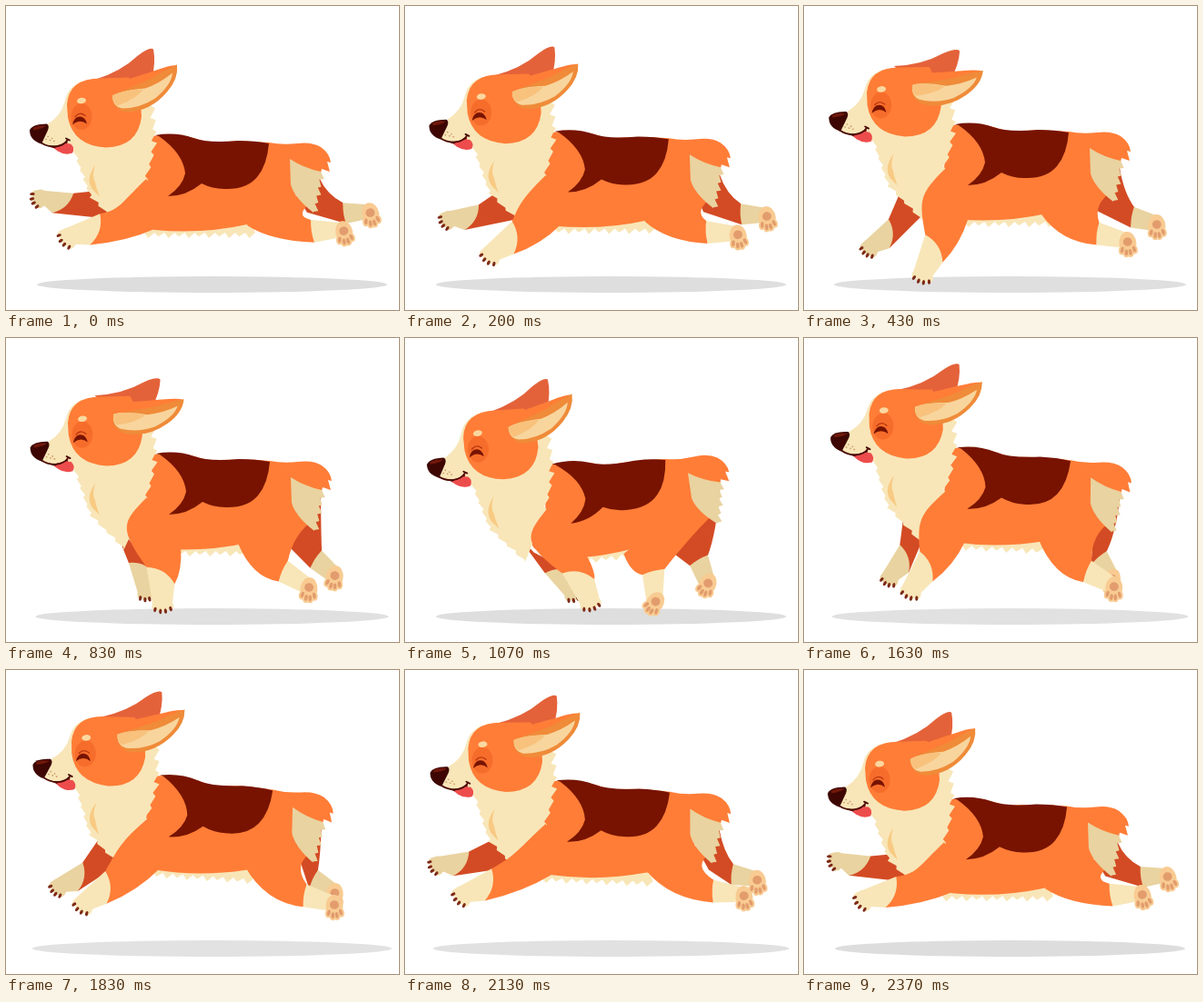
An HTML page with a canvas for the animation above (2410 ms loop, 432 by 334 pixels).

```html
<!DOCTYPE html>
<html lang="en">
<head>
<meta charset="utf-8">
<title>Running corgi</title>
<style>
html, body { margin: 0; width: 100%; height: 100%; overflow: hidden; background: #fff; }
canvas { display: block; }
</style>
</head>
<body>
<canvas id="stage" width="432" height="334"></canvas>
<script>
const ctx = document.getElementById('stage').getContext('2d');
const LOOP = 2410;
const ORANGE = '#ff7d37', RED = '#d34b24', CREAM = '#f8e6b8', SAND = '#e9d3a0',
      BROWN = '#771300', TAN = '#f8cb92', PAD = '#e29c6d', CLAW = '#7d2a17';

// Key poses of one stride: the withers with their tilt, and where each paw is.
const TIMES = [0, 430, 830, 1070, 1430, 1830];
const WITHERS = [[170, 172, 171, 167, 173, 175], [142, 130, 127, 138, 128, 116], [0, 0, 0, -6.3, .7, 3.6]];
const PAWS = {
  nearFront: [[69, 131, 172, 203, 155, 86], [254, 294, 291, 289, 294, 257]],
  farFront: [[38, 73, 154, 184, 135, 59], [211, 265, 278, 279, 283, 238]],
  nearHind: [[372, 356, 333, 274, 316, 361], [250, 262, 277, 292, 290, 261]],
  farHind: [[401, 388, 361, 332, 320, 361], [230, 243, 264, 272, 283, 248]]
};

// How a leg hangs: joint in the torso, shin and cuff length, cuff turn, swing gain.
const FRONT = { shin: 30, cuff: 36, turn: -55, gain: 1.1 };
const HIND = { shin: 35, cuff: 25, turn: -103, gain: 1 };
const LIMBS = {
  nearFront: { ...FRONT, joint: [-5, 70] },
  farFront: { ...FRONT, joint: [-30, 75], shin: 25, cuff: 32 },
  nearHind: { ...HIND, joint: [95, 100] },
  farHind: { ...HIND, joint: [135, 80], shin: 29, cuff: 23 }
};

// Smooth cyclic curve through the key values.
function sample(values, t) {
  const n = TIMES.length;
  const time = i => TIMES[(i + n) % n] + Math.floor(i / n) * LOOP;
  const value = i => values[(i + n) % n];
  const slope = i => {
    const before = time(i) - time(i - 1), after = time(i + 1) - time(i);
    return ((value(i) - value(i - 1)) / before * after +
            (value(i + 1) - value(i)) / after * before) / (before + after);
  };
  let i = n - 1;
  while (TIMES[i] > t) i--;
  const span = time(i + 1) - time(i), u = (t - time(i)) / span;
  const a = slope(i) * span, b = slope(i + 1) * span, rise = value(i + 1) - value(i);
  return value(i) + u * (a + u * (3 * rise - 2 * a - b + u * (a + b - 2 * rise)));
}

const rad = deg => deg * Math.PI / 180;
const mix = (a, b, u) => a + (b - a) * u;
const between = (p, q, u) => [mix(p[0], q[0], u), mix(p[1], q[1], u)];

function ease(from, to, t) {
  const u = Math.min(1, Math.max(0, (t - from) / (to - from)));
  return u * u * (3 - 2 * u);
}

function local([x, y, deg], px, py) {
  const c = Math.cos(rad(deg)), s = Math.sin(rad(deg));
  return [x + px * c - py * s, y + px * s + py * c];
}

function at(x, y, deg, draw) {
  ctx.save();
  ctx.translate(x, y);
  ctx.rotate(rad(deg));
  draw();
  ctx.restore();
}

function turned(x, y, deg, draw) {
  at(x, y, deg, () => { ctx.translate(-x, -y); draw(); });
}

function fill(color, d) {
  ctx.fillStyle = color;
  ctx.fill(new Path2D(d));
}

function line(color, width, d) {
  ctx.strokeStyle = color;
  ctx.lineWidth = width;
  ctx.lineCap = 'round';
  ctx.stroke(new Path2D(d));
}

function oval(color, x, y, rx, ry, deg = 0) {
  ctx.fillStyle = color;
  ctx.beginPath();
  ctx.ellipse(x, y, rx, ry, rad(deg), 0, 7);
  ctx.fill();
}

// Jagged edge from p to q; tip says where along each tuft its point lies.
function fur(p, q, tufts, depth, tip) {
  const [dx, dy] = [q[0] - p[0], q[1] - p[1]], size = Math.hypot(dx, dy);
  let d = `L${p}`;
  for (let i = 0; i < tufts; i++) {
    const [x, y] = between(p, q, (i + tip) / tufts);
    const out = depth * (i % 2 ? .7 : 1) / size;
    d += `L${x - dy * out} ${y + dx * out}L${between(p, q, (i + 1) / tufts)}`;
  }
  return d;
}

function bendLeg(limb, torso, paw) {
  const [x, y] = local(torso, ...limb.joint);
  const aim = Math.atan2(paw[1] - y, paw[0] - x) * 180 / Math.PI;
  const swing = 90 + ((aim + 450) % 360 - 180) * limb.gain;
  const cuff = [...local([...paw, swing], -limb.shin, 0), swing + limb.turn];
  return { paw, swing, front: local(cuff, -limb.cuff / 2, 0), back: local(cuff, limb.cuff / 2, 0) };
}

function shin(color, { front, back }, pawFront, pawBack, bulge) {
  const [x, y] = between(front, back, .5);
  const bend = [x + (back[1] - front[1]) * bulge, y - (back[0] - front[0]) * bulge];
  fill(color, `M${front}Q${bend} ${back}L${pawBack}L${pawFront}Z`);
}

function eachToe(draw) {
  for (const side of [-1, -1 / 3, 1 / 3, 1]) draw(side, side * side);
}

function frontFoot(color, leg, size) {
  const foot = [...leg.paw, 90 + (leg.swing - 90) * .68];
  shin(color, leg, local(foot, 0, size), local(foot, -1, -size), .28);
  at(...foot, () => {
    oval(color, 0, 0, 9, size);
    eachToe((side, curl) => {
      oval(color, 6 - 2.5 * curl, side * size * .78, 4, size * .3);
      oval(CLAW, 9.5 - 2.5 * curl, side * size * .78, 2.8, 1.6, side * 18);
    });
  });
}

function hindFoot(color, leg) {
  const foot = [...leg.paw, 75 + leg.swing * .55];
  shin(color, leg, local(foot, 3, 8), local(foot, -11, -4), .1);
  at(...foot, () => {
    oval(TAN, -1, 0, 13, 9.5);
    eachToe((side, curl) => oval(TAN, 10 - 3.5 * curl, side * 7, 4.5, 3.5));
    eachToe((side, curl) => oval(PAD, 9 - 3.5 * curl, side * 6.6, 3.4, 1.8, side * 15));
    oval(PAD, -3, 0, 4.8, 5);
  });
}

function drawTorso() {
  fill(CREAM, `M-18 96${fur([-18, 107], [104, 107], 11, 6, .4)}L98 92Z`);
  fill(ORANGE, 'M-14 2Q18-5 52 8Q85 5 119 8Q134 11 150 9Q166 7 176 13Q186 20 187 30L183 29L186 40L177 37L175 46L144 36L148 62L150 75L130 94L95 98Q45 109-7 104L-35 90Q-44 76-18 48Z');
  fill(BROWN, 'M-6 0Q16-4 36 3Q52 9 85 6Q104 6 119 9Q117 33 106 46Q94 60 70 59Q57 59 45 53Q28 67 8 67Q24 56 27 42Q25 20-2 1Z');
}

function drawPants() {
  fill(SAND, `M142 26L143 54Q147 69 168 85${fur([168, 84], [176, 40], 5, 5, .2)}Q157 36 142 26Z`);
}

function drawChest() {
  fill(CREAM, 'M68 110L72 158' + fur([74, 160], [92, 210], 5, -3, .8) + fur([92, 210], [130, 247], 4, -3, .8) +
    fur([156, 190], [166, 150], 3, -4, .2) + fur([166, 150], [164, 112], 3, -6, .2) + 'L150 103Z');
  fill('#f8ca83', 'M98 174Q87 190 95 201L103 209Q99 199 98 193Q94 187 98 174Z');
}

function drawFace() {
  fill(CREAM, 'M84 82Q68 88 65 103Q61 120 46 129L39 151Q50 156 60 154L72 160L100 158L100 90Z');
  fill(ORANGE, 'M67 108Q69 79 104 79L135 78Q149 99 149 121Q145 154 110 155Q74 153 68 122Z');
  oval('#f66d2b', 83, 121, 11.5, 14.5);
  oval('#fbd8a0', 83, 103.5, 5, 3.3, -8);
  line('#b8360f', 1.3, 'M76 121Q81 115 87 120');
  fill(BROWN, 'M73 130Q75 121 81 121Q87 121 89 129Q81 123 73 130Z');
  fill('#3d0602', 'M26 136Q29 129 45 129Q48 131 46 136L39 151Q26 147 26 136Z');
  fill('#70180a', 'M30 133Q36 130 44 131Q42 134 30 136Z');
  fill('#650f07', 'M43 152Q55 156 68 148L66 155L56 157Z');
  fill('#ed4c4c', 'M53 156Q61 149 71 151Q76 155 73 161Q65 164 57 159Z');
  line('#4a0904', 1.8, 'M39 150Q45 154 54 154Q64 153 68 146M66 145L70 147');
  for (let i = 0; i < 5; i++) oval('#c99363', 44 + 2.2 * i, i % 2 ? 142 + i : 146 + i / 2, .9, .8);
}

function drawFarEar() {
  fill('#e4623a', 'M96 81Q126 72 145 54Q158 44 162 47Q165 62 160 80L118 90Z');
}

function drawNearEar() {
  fill(ORANGE, 'M116 86Q150 75 165 70Q182 64 188 65L180 80L140 96L116 97Z');
  fill('#ef8b39', 'M116 98Q135 90 158 80Q174 70 188 64Q190 79 177 94Q159 115 134 116Q118 115 116 98Z');
  fill('#f8d59d', 'M117 98Q128 92 153 90Q168 85 183 73Q182 86 164 101Q147 112 128 112Q117 110 117 98Z');
  fill('#f8c27d', 'M117 98Q128 92 151 91Q144 101 123 109Q117 106 117 98Z');
}

function frame(t) {
  const torso = WITHERS.map(values => sample(values, t));
  torso[1] -= 8 * Math.sin(Math.PI * ease(1830, LOOP, t));
  const [x, y, tilt] = torso, lift = 142 - y;
  const spot = (px, py) => local(torso, px, py);
  const legs = {};
  for (const name in LIMBS) {
    legs[name] = bendLeg(LIMBS[name], torso, PAWS[name].map(values => sample(values, t)));
  }
  const { nearFront, farFront, nearHind, farHind } = legs;

  // The head rides on the withers; the ears droop while the dog is grounded.
  const earTilt = 13 * ease(130, 430, t) * (1 - ease(830, 1070, t)) + 2 * ease(1070, 1500, t) * (1 - ease(2000, 2370, t));
  const inTorso = draw => at(...torso, draw);
  const inHead = draw => {
    ctx.save();
    ctx.translate((x - 170) * .9, .5 - lift - tilt * .6);
    turned(108, 116, (x - 170) * .65, draw);
    ctx.restore();
  };

  ctx.fillStyle = '#fff';
  ctx.fillRect(0, 0, 432, 334);
  const grey = 221 + lift * .2;
  oval(`rgb(${grey},${grey},${grey})`, 226.5, 306, 192.5 + lift * lift * .0075, 9);

  // Far legs
  const hock = spot(175, 48), knee = between(nearHind.back, spot(148, 60), .25);
  const bend = [mix(hock[0], farHind.back[0], .3), mix(hock[1], farHind.back[1], .65)];
  fill(RED, `M${spot(140, 50)}L${hock}Q${bend} ${farHind.back}L${farHind.front}L${knee}Z`);
  hindFoot(SAND, farHind);
  fill(RED, `M${farFront.front}L${spot(-60, 60)}L${spot(-36, 94)}L${farFront.back}Z`);
  frontFoot(SAND, farFront, 9.5);

  // Near legs join the belly further back or forward as the paw swings.
  inTorso(drawTorso);
  const groin = [172 + nearHind.paw[0] * .25, y + 99];
  const dip = [mix(groin[0], nearHind.front[0], .35), mix(groin[1], nearHind.front[1], .9)];
  fill(ORANGE, `M${groin}Q${dip} ${nearHind.front}L${nearHind.back}Q${spot(145, 88)} ${spot(168, 72)}L${spot(125, 60)}L${spot(105, 80)}Z`);
  hindFoot(CREAM, nearHind);
  inTorso(drawPants);

  inHead(drawChest);
  const armpit = [144 + nearFront.paw[0] * .28, y + 103];
  const [ex, ey] = between(nearFront.back, armpit, .5);
  fill(ORANGE, `M${spot(-16, 48)}C${spot(-45, 76)} ${spot(-46, 83)} ${nearFront.front}L${nearFront.back}Q${ex + 5} ${ey + 5} ${armpit}L${spot(8, 85)}Z`);
  frontFoot(CREAM, nearFront, 11);

  inHead(() => {
    turned(110, 80, earTilt, drawFarEar);
    drawFace();
    turned(118, 100, earTilt, drawNearEar);
  });
}

const start = performance.now();
function tick() {
  frame((performance.now() - start) % LOOP);
  requestAnimationFrame(tick);
}
tick();
</script>
</body>
</html>
```
